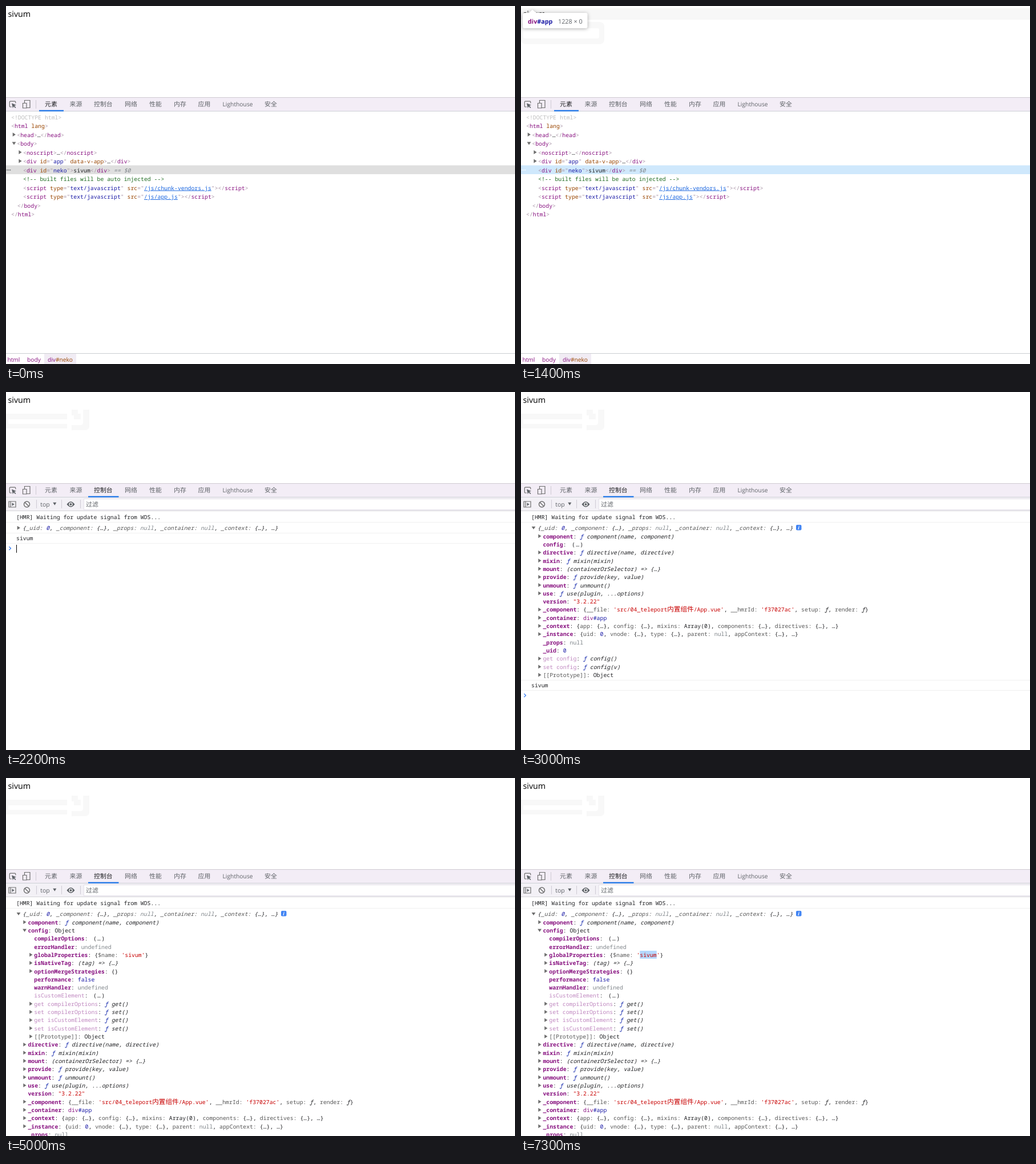
Write an HTML page that moves like this. It is 892 px wide and 628 px high and loops after 8.9 s.

```html
<!DOCTYPE html>
<html lang="zh">
<head>
<meta charset="utf-8">
<title>Console demo</title>
<style>
html, body { margin: 0; width: 100%; height: 100%; overflow: hidden; background: #fff; }
svg { display: block; width: 892px; height: 628px; }
text { white-space: pre; text-rendering: geometricPrecision; }
.ui { font-family: "Open Sans", "Noto Sans CJK SC", "Noto Sans CJK", sans-serif; fill: #5f6368; }
.ui.dark { fill: #202124; }
.mono { font: 9.82px "Noto Sans Mono", "DejaVu Sans Mono", "Noto Sans CJK SC", monospace; fill: #202124; }
.page { font-size: 14.3px; fill: #000; }
.t { fill: #881280; } .a { fill: #994500; } .v { fill: #1a1aa6; }
.p { fill: #a894a6; } .d { fill: #c0c0c0; } .c { fill: #236e25; }
.l { fill: #1a66e0; text-decoration: underline; }
.b { fill: #881280; font-weight: 700; } .g { fill: #c088c0; }
.s { fill: #c80000; } .w { fill: #c80000; font: 11.6px "Noto Sans CJK SC", "Noto Sans CJK", sans-serif; }
.f { fill: #0d22aa; font-style: italic; } .i { font-style: italic; }
.y { fill: #565656; } .u { fill: #80868b; }
.x { fill: #565656; font-style: italic; } .q { fill: #80868b; font-style: italic; }
.z { fill: #1a1aa6; font-style: italic; }
.j { font-size: 6px; } .e { letter-spacing: 1.2px; }
.tip rect, .tip path { fill: #fff; }
.tip { filter: drop-shadow(0 1px 3px rgba(0, 0, 0, .32)); }
.icon { fill: none; stroke: #6e6e6e; stroke-width: 1.2; }
</style>
</head>
<body>
<svg id="stage" viewBox="0 0 892 628"></svg>
<script>
const LOOP = 8900, WORD = 'sivum';

const esc = s => s.replace(/&/g, '&amp;').replace(/</g, '&lt;').replace(/>/g, '&gt;');
const rect = (x, y, w, h, fill, more = '') =>
  `<rect x="${x}" y="${y}" width="${w}" height="${h}" fill="${fill}" ${more}/>`;
const path = (d, more = '') => `<path d="${d}" ${more}/>`;
const group = (id, ...parts) => `<g id="${id}">${parts.join('')}</g>`;
const ui = (x, y, s, size, more = '', kind = '') =>
  `<text class="ui ${kind}" x="${x}" y="${y}" font-size="${size}" ${more}>${s}</text>`;

// "~k" switches to colour class k
const code = (x, y, markup) => `<text class="mono" x="${x}" y="${y}">` +
  markup.split('~').slice(1).map(s => `<tspan class="${s[0]}">${esc(s.slice(1))}</tspan>`).join('') + '</text>';

const arrow = (x, y, open) => path(open
  ? `M${x - 3.4} ${y - 2.4}h6.8l-3.4 5.2z`
  : `M${x - 2.3} ${y - 3.4}v6.8l5.2 -3.4z`, 'fill="#6e6e6e"');

// Element tree
const open = (tag, attrs = '') => `~p<~t${tag}${attrs}~p>`;
const close = tag => `~p</~t${tag}~p>`;
const attr = (name, value, kind = 'v') => `~a ${name}~p="~${kind}${value}~p"`;
const script = src => open('script', attr('type', 'text/javascript') + attr('src', src, 'l')) + close('script');
const tree = [
  [9, '~d<!DOCTYPE html>'],
  [9, open('html', '~a lang')],
  [19.3, open('head') + '~n…' + close('head'), 'shut'],
  [19.3, open('body'), 'open'],
  [30, open('noscript') + '~n…' + close('noscript'), 'shut'],
  [30, open('div', attr('id', 'app') + '~a data-v-app') + '~n…' + close('div'), 'shut'],
  [30, open('div', attr('id', 'neko')) + '~n' + WORD + close('div') + '~q == $0'],
  [30, '~c<!-- built files will be auto injected -->'],
  [30, script('/js/chunk-vendors.js')],
  [30, script('/js/app.js')],
  [19.7, close('body')],
  [9, close('html')]
].map(([x, s, fold], i) => {
  const y = 198.5 + 15.5 * i;
  return code(x, y, s) + (fold ? arrow(x - 5.3, y - 4, fold === 'open') : '');
}).join('');

// Console rows: [level, has arrow, markup, is open]
const fn = (key, sig, kind = 'b') => [0, 1, `~${kind}${key}~n: ~fƒ ~i${sig}`];
const nest = ([, has, s]) => [1, has, s];
const dots = '~j ~e(…)';
const proto = [0, 1, '~y[[Prototype]]~n: Object'];
const list = (...pairs) => '~n{' + pairs.map(([k, v]) => `~y${k}: ${v}`).join('~n, ');
const more = '~n, …}', obj = '~n{…}';

const first = [fn('component', 'component(name, component)')];
const configDots = [[0, 0, '~bconfig~n: ' + dots]];
const configShut = [[0, 1, '~bconfig~n: Object']];
const configOpen = [
  [0, 1, '~bconfig~n: Object', true],
  [1, 0, '~bcompilerOptions~n: ' + dots],
  [1, 0, '~berrorHandler~n: ~uundefined'],
  [1, 1, `~bglobalProperties~n: {~y$name: ~s'${WORD}'~n}`],
  [1, 1, '~bisNativeTag~n: ~i(tag) => {…}'],
  [1, 1, '~boptionMergeStrategies~n: {}'],
  [1, 0, '~bperformance~n: ~vfalse'],
  [1, 0, '~bwarnHandler~n: ~uundefined'],
  [1, 0, '~gisCustomElement~n: ' + dots],
  ...['compilerOptions', 'isCustomElement'].flatMap(k =>
    ['get', 'set'].map(m => nest(fn(`${m} ${k}`, m + '()', 'g')))),
  nest(proto)
];
const rest = [
  fn('directive', 'directive(name, directive)'),
  fn('mixin', 'mixin(mixin)'),
  [0, 1, '~bmount~n: ~i(containerOrSelector) => {…}'],
  fn('provide', 'provide(key, value)'),
  fn('unmount', 'unmount()'),
  fn('use', 'use(plugin, ...options)'),
  [0, 0, '~bversion~n: ~s"3.2.22"'],
  [0, 1, '~b_component~n: ' + list(['__file', "~s'src/04_teleport~w内置组件~s/App.vue'"],
    ['__hmrId', "~s'f37027ac'"], ['setup', '~iƒ'], ['render', '~iƒ']) + '~n}'],
  [0, 1, '~b_container~n: ~tdiv~v#app'],
  [0, 1, '~b_context~n: ' + list(['app', obj], ['config', obj], ['mixins', '~nArray(0)'],
    ['components', obj], ['directives', obj]) + more],
  [0, 1, '~b_instance~n: ' + list(['uid', '~v0'], ['vnode', obj], ['type', obj],
    ['parent', '~unull'], ['appContext', obj]) + more],
  [0, 0, '~b_props~n: ~unull'],
  [0, 0, '~b_uid~n: ~v0'],
  fn('get config', 'config()', 'g'),
  fn('set config', 'config(v)', 'g'),
  proto
];
const STEP = 14.32;
const rows = (items, start) => items.map(([level, has, s, isOpen], i) => {
  const x = 38.4 + 10.9 * level, y = 256.6 + STEP * (start + i);
  return code(x, y, s) + (has ? arrow(x - 5.8, y - 3.8, isOpen) : '');
}).join('');

const line = y => rect(0, y, 892, 1, '#f0f0f0');
const tail = y => line(y) + code(18, y + 13.2, '~n' + WORD) + line(y + 18) +
  path(`M5.4 ${y + 24.3}l3 3l-3 3`, 'fill="none" stroke="#367cf1" stroke-width="1.3"');
const preview = code(29, 242, '~i{~x_uid: ~z0~i, ~x_component: ~i{…}, ~x_props: ~qnull~i, ' +
  '~x_container: ~qnull~i, ~x_context: ~i{…}, …}');
const info = rect(482, 233, 9.5, 9.5, '#4285f4', 'rx="2"') +
  ui(485.2, 241, 'i', 8.5, 'style="fill:#fff" font-weight="700" font-style="italic"');

// Page overlays
const BLUE = 'rgba(111,168,220,.66)', ORANGE = 'rgba(246,178,107,.66)';
const tip = (y, right, tag, id, size, sizeX) => '<g class="tip">' +
  rect(3, y, right - 3, 27, '#fff', 'rx="3"') + path(`M13 ${y + .5}l7 -6l7 6z`) + '</g>' +
  ui(12, y + 18.6, `<tspan class="t">${tag}</tspan><tspan class="v">${id}</tspan>`, 10.8, 'font-weight="700"') +
  ui(sizeX, y + 18.6, size, 10.8);
const GHOST = '#f8f8f8';

// Tool bars
const tabs = [['元素', 68], ['来源', 111.5], ['控制台', 154], ['网络', 208], ['性能', 251],
  ['内存', 294], ['应用', 336.5], ['Lighthouse', 379.5], ['安全', 453]];
const tab = ([s, x], kind) => ui(x, 176.3, s, s.length > 4 ? 10.3 : 10.9, '', kind);
const [elementsTab, , consoleTab] = tabs;
const plainTabs = tabs.filter(t => t !== elementsTab && t !== consoleTab);
const chosen = (t, x, w) => tab(t, 'dark') + rect(x, 182.6, w, 2.2, '#1a73e8');
const bar = (x, y) => rect(x, y, 1, 15, '#cfcbd4');

const header = rect(0, 160, 892, 25, '#f3edf6') + rect(0, 160, 892, 1, '#cfcbd2') + rect(0, 184, 892, 1, '#cdd0d6') +
  path('M10 177H7.5Q6.3 177 6.3 175.5V168.5Q6.3 167.2 7.5 167.2H15.5Q16.8 167.2 16.8 168.5V170.5', 'class="icon"') +
  path('M10 170.5l8 3.2l-3.3 1.3l2.8 2.9l-1.2 1.2l-2.9 -2.9l-1.5 3z', 'fill="#5f6368"') +
  path('M32.5 170V165.5H42V178.5H36.5M29.5 170.5H36V179H29.5z', 'class="icon"') + bar(52, 165);

const consoleBar = rect(0, 185, 892, 23, '#f3f1f6') + rect(0, 208, 892, 1, '#d4d4d8') +
  rect(136.5, 187.5, 760, 19, '#fff', 'stroke="#e3dfe8"') +
  path('M5 192H17V202H5zM8 192V202', 'class="icon"') + path('M10.5 194.2v5.6l4.2 -2.8z', 'fill="#5f6368"') +
  '<circle cx="36.5" cy="197" r="5" class="icon" style="stroke-width:1.5"/>' +
  path('M33 193.5l7 7', 'class="icon" style="stroke-width:1.5"') +
  bar(53, 189) + ui(60.3, 200.6, 'top', 10.5) + path('M82.3 193.8h6l-3 5z', 'fill="#5f6368"') + bar(97, 189) +
  path('M106.5 197Q113.5 187.5 120.5 197Q113.5 206.5 106.5 197z', 'fill="#5f6368"') +
  '<circle cx="113.5" cy="197" r="2.6" fill="#5f6368" stroke="#fff" stroke-width="1.2"/>' +
  bar(130, 189) + ui(140, 200.8, '过滤', 10.9);

const crumbs = rect(0, 609, 892, 1, '#cbcdd1') + rect(67, 610, 56, 18, '#f1ecf4') +
  ui(2.5, 624.4, '<tspan class="t">html</tspan>', 10.2) + ui(37, 624.4, '<tspan class="t">body</tspan>', 10.2) +
  ui(73, 624.4, '<tspan class="t">div</tspan><tspan class="a">#neko</tspan>', 10.2);

const rowDots = color => [2, 4.7, 7.4].map(x => `<circle cx="${x}" cy="287.7" r=".9" fill="${color}"/>`).join('');

const stage = document.getElementById('stage');
stage.innerHTML = [
  group('trace', rect(0, 4, 892, 20, '#f7f7f7'), rect(0, 28, 146, 39, GHOST, 'rx="8"'), rect(4, 39, 133, 18, '#fff', 'rx="3"')),
  group('residue', path('M0 38H107V48H4V56H107V64H0z', `fill="${GHOST}"`),
    path('M115 31H126V38H131V48H119V41H115zM135 31H146V60Q146 67 138 67H115V58H131Q135 58 135 54z', `fill="${GHOST}"`)),
  `<text class="ui page" x="3.5" y="19.3">${WORD}</text>`,
  group('tipNeko', rect(3.5, 4, 889, 19, BLUE), tip(30, 137.5, 'div', '#neko', '1228 × 20.8', 71)),
  group('tipApp', tip(12, 116.5, 'div', '#app', '1228 × 0', 65)),
  group('tipBody', rect(3.5, 4, 889, 19, BLUE),
    path('M0 0H892V4H3.5V23H892V27H0z', `fill="${ORANGE}"`), tip(34, 115.5, 'body', '', '1228 × 20.8', 49)),
  header,
  group('tabHover', rect(144, 161, 53.5, 23, '#e9e7ea'), tab(consoleTab, 'dark')),
  plainTabs.map(t => tab(t)).join(''),
  group('consoleIdle', tab(consoleTab)),
  group('elements', chosen(elementsTab, 58, 43),
    group('rowGray', rect(0, 279.5, 892, 15.5, '#dfdfdf'), rowDots('#5f6368')),
    group('rowBlue', rect(0, 279.5, 892, 15.5, '#cfe8fc'), rowDots('#fff')),
    tree, crumbs),
  group('console', tab(elementsTab), chosen(consoleTab, 144, 53.5), consoleBar),
  group('log', code(18, 222.7, '~n[HMR] Waiting for update signal from WDS...'), line(228), preview),
  group('folded', arrow(22, 238.3, false), tail(247)),
  group('caret', rect(18, 268, 1, 14, '#000')),
  group('unfolded', arrow(22, 238.3, true), info, rows(first, 0)),
  group('cfgDots', rows(configDots, 1)),
  group('cfgLine', rect(85, 271, 30, 1, '#303942')),
  group('cfgShut', rows(configShut, 1)),
  group('short', rows(rest, 2), tail(505)),
  group('cfgOpen', '<rect id="mark" x="208.3" y="303" width="0" height="14" fill="#b5d8fd"/>',
    rows(configOpen, 1), rows(rest, 1 + configOpen.length))
].join('');

// Visible span of each group, in ms
const spans = {
  tipNeko: [600, 1400], trace: [1400, 1500], tipApp: [1400, 1500], tipBody: [1500, 1600], residue: [1500, LOOP],
  rowGray: [0, 900], rowBlue: [900, 2000], consoleIdle: [0, 1800], tabHover: [1800, 2000],
  elements: [0, 2000], console: [2000, LOOP], log: [2100, LOOP], folded: [2100, 3000], caret: [2100, 2600],
  unfolded: [3000, LOOP], cfgDots: [3000, 4100], cfgLine: [3600, 4100], cfgShut: [4100, 4900],
  short: [3000, 4900], cfgOpen: [4900, LOOP]
};
const parts = Object.entries(spans).map(([id, span]) => [document.getElementById(id), ...span]);
const mark = document.getElementById('mark');

function draw(t) {
  for (const [el, from, to] of parts) el.style.display = t >= from && t < to ? '' : 'none';
  const letters = t < 6800 ? 0 : t < 6900 ? 2 : t < 7300 ? 4 : 5;
  mark.setAttribute('width', letters * 5.89);
}

const start = performance.now();
function tick() {
  draw((performance.now() - start) % LOOP);
  requestAnimationFrame(tick);
}
tick();
</script>
</body>
</html>
```
